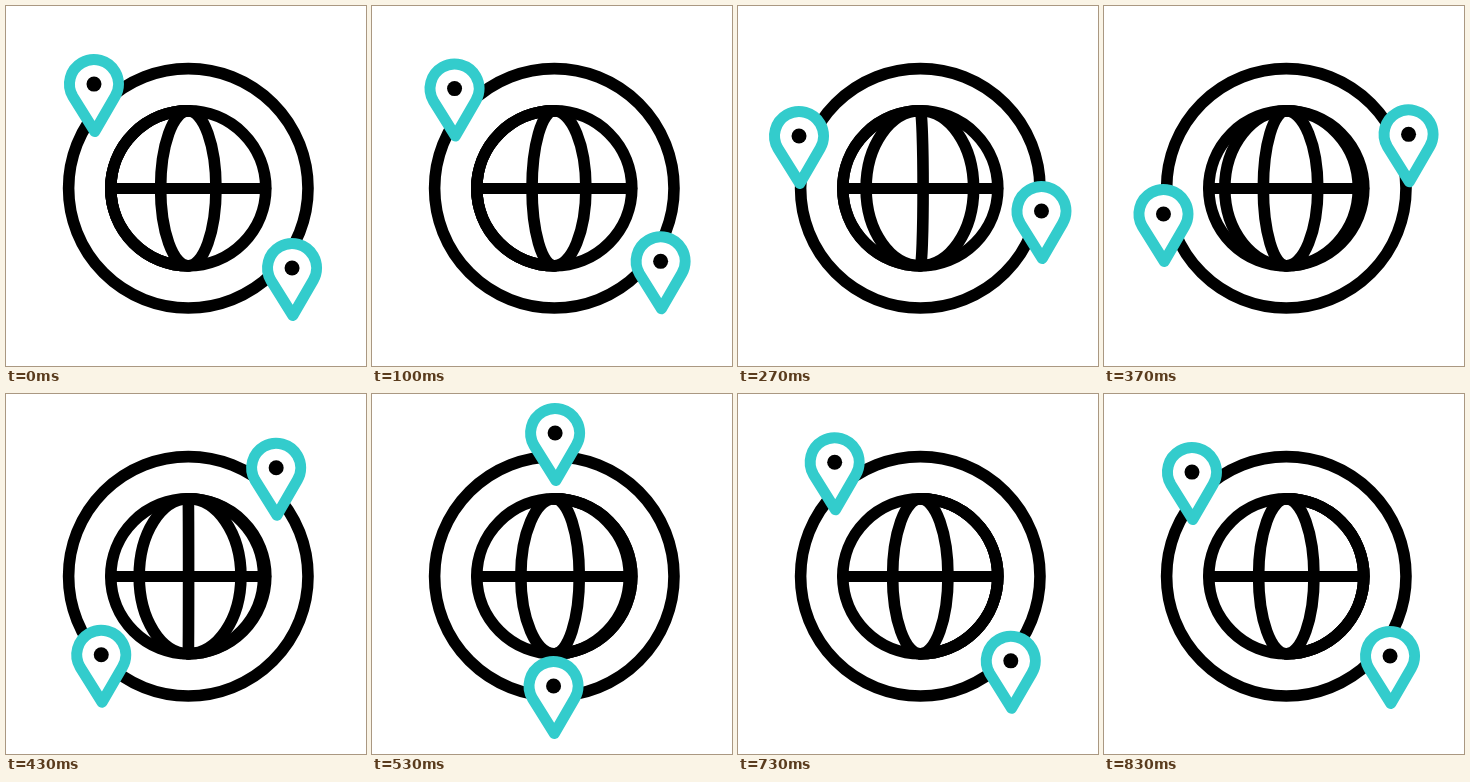
An HTML page with a canvas for the animation above (1.67 s loop, 360x360 px).

```html
<!DOCTYPE html>
<html lang="en">
<head>
<meta charset="utf-8">
<title>Globe with orbiting pins</title>
<style>
html, body { margin: 0; width: 100%; height: 100%; overflow: hidden; background: #fff; }
canvas { display: block; width: 100vw; height: 100vh; }
</style>
</head>
<body>
<canvas id="stage" width="360" height="360"></canvas>
<script>
const ctx = document.getElementById('stage').getContext('2d');
const LOOP = 1670, FPS = 30;
const C = 182.3, R = 77.5, RING = 119.7;
const TEAL = '#33cccc';

// Key steps shared by every animated value
const STEPS = [0, 5, 8, 11, 16, 19, 25];
const MERIDIANS = [
  [-27.7, -15.5, 2.8, 31.5, 75, R, R],
  [27.7, 36.8, 53.3, 72, R, R, R],
  [-R, -R, -54.2, -23, 25, 27.7, 27.7],
  [-R, -R, -R, -61.5, -33.5, -27.7, -27.7]
];
const PINS = [
  { angle: [223.4, 216, 197, 161.5, 90.2, 59.8, 42.4],
    radius: [129.4, 131, 126.5, 129.2, 125, 127.3, 140.9] },
  { angle: [42.4, 35.7, 17.4, -17.5, -89.5, -118.1, -136.6],
    radius: [140.9, 135.4, 127.3, 128.5, 128, 131.5, 129.4] }
];

function secant(v, i) {
  return (v[i + 1] - v[i]) / (STEPS[i + 1] - STEPS[i]);
}

function slope(v, i) {
  if (i === 0 || i === v.length - 1) return 0;
  const a = secant(v, i - 1), b = secant(v, i);
  return a * b > 0 ? 2 * a * b / (a + b) : 0;
}

// Monotone cubic interpolation
function valueAt(v, step) {
  const last = STEPS.length - 1;
  if (step >= STEPS[last]) return v[last];
  let i = 0;
  while (step >= STEPS[i + 1]) i++;
  const h = STEPS[i + 1] - STEPS[i], u = (step - STEPS[i]) / h;
  const s = u * u * (3 - 2 * u);
  return v[i] + (v[i + 1] - v[i]) * s
    + h * u * (1 - u) * ((1 - u) * slope(v, i) - u * slope(v, i + 1));
}

function circle(x, y, r) {
  ctx.beginPath();
  ctx.arc(x, y, r, 0, Math.PI * 2);
}

function meridian(w) {
  ctx.beginPath();
  ctx.ellipse(C, C, Math.abs(w), R, 0, -Math.PI / 2, Math.PI / 2, w < 0);
  ctx.stroke();
}

function pin(x, y) {
  ctx.beginPath();
  ctx.arc(x, y, 24.5, Math.PI * 5 / 6, Math.PI / 6);
  ctx.lineTo(x + 0.8, y + 47.5);
  ctx.closePath();
  ctx.fillStyle = '#fff';
  ctx.fill();
  ctx.strokeStyle = TEAL;
  ctx.stroke();
  circle(x, y, 7.5);
  ctx.fillStyle = '#000';
  ctx.fill();
}

function draw(step) {
  ctx.fillStyle = '#fff';
  ctx.fillRect(0, 0, 360, 360);
  ctx.lineJoin = ctx.lineCap = 'round';
  ctx.strokeStyle = '#000';
  ctx.lineWidth = 11.6;
  for (const r of [RING, R]) {
    circle(C, C, r);
    ctx.stroke();
  }
  for (const m of MERIDIANS) meridian(valueAt(m, step));

  ctx.lineWidth = 11;
  ctx.beginPath();
  ctx.moveTo(C - R, 182.5);
  ctx.lineTo(C + R, 182.5);
  ctx.stroke();

  for (const p of PINS) {
    const a = valueAt(p.angle, step) * Math.PI / 180, r = valueAt(p.radius, step);
    pin(182 + r * Math.cos(a), 167 + r * Math.sin(a));
  }
}

const start = performance.now();
function tick() {
  const t = (performance.now() - start) % LOOP;
  draw(Math.floor((t + 3.4) * FPS / 1000));
  requestAnimationFrame(tick);
}
tick();
</script>
</body>
</html>
```
